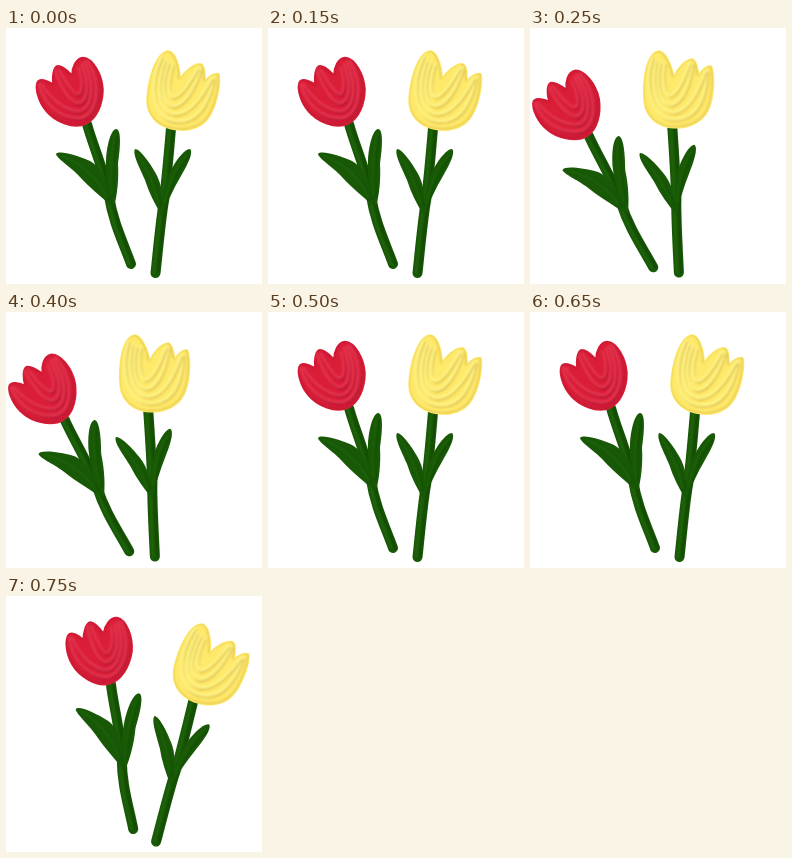
An HTML page for the animation above (1 s loop, 256x256 px).

```html
<!DOCTYPE html>
<html lang="en">
<head>
<meta charset="utf-8">
<title>Swaying tulips</title>
<style>
  html, body { margin: 0; width: 100%; height: 100%; overflow: hidden; background: #fff; }
  svg { display: block; width: 100vw; height: 100vh; }
  path { stroke-linecap: round; stroke-linejoin: round; }
</style>
</head>
<body>
<svg viewBox="0 0 256 256">
  <defs>
    <filter id="soft" filterUnits="userSpaceOnUse" x="0" y="0" width="256" height="256"><feGaussianBlur stdDeviation=".8"/></filter>
  </defs>
  <g id="flowers"></g>
</svg>
<script>
const tulips = [
  {
    base: '#da1e38', dark: '#b01430', light: '#ea3a54',
    stem: 'M81 96C87 118 98 142 103 168C107 194 117 214 125 236',
    leaves: [
      'M50 126C53 122 70 127 84 133C97 140 103 158 106 179C96 169 85 161 73 148C65 139 51 131 50 126Z',
      'M110 101C116 101 114 122 112 136C113 152 111 168 108 179C102 164 99 148 100 132C101 116 105 102 110 101Z'
    ],
    ribs: ['M56 128Q88 141 101 169', 'M109 107Q104 135 106 166'],
    head: 'M31 55C33 49 42 53 47 56C46 49 47 40 51 38C56 37 62 43 66 47C66 39 70 30 77 29.5C87 30 96 46 97 61C97 76 91 91 80 96C67 102 48 93 40 83C33 75 29 62 31 55Z',
    folds: [
      'M83 35C98 60 92 90 74 92C56 92 40 80 34 58',
      'M80 36C92 62 86 84 73 85C59 84 45 72 37 58',
      'M77 38C86 60 82 76 73 77C63 75 56 60 50 44',
      'M74 42C79 58 77 68 72 68C65 64 59 52 54 44'
    ]
  },
  {
    base: '#fee96a', dark: '#dfbf4c', light: '#fff88e',
    stem: 'M165 100C163 124 161 148 158 172C154 198 152 222 149.5 245',
    leaves: [
      'M129 121C134 121 144 135 149 144C156 155 158 172 156 188C149 176 143 165 139 152C134 140 126 126 129 121Z',
      'M184 121C188 124 181 138 175 148C168 160 161 174 156 187C155 172 158 157 164 144C169 134 178 121 184 121Z'
    ],
    ribs: ['M132 126Q148 151 153 176', 'M181 127Q165 145 159 175'],
    head: 'M162 23C169 23 174 38 174 51C178 44 188 35 195 36C199 38 199 46 199 53C203 48 209 44 213 46C215 57 210 79 203 89C195 101 179 104 166 101C151 98 141 87 141 72C142 53 149 25 162 23Z',
    folds: [
      'M157 30C143 60 148 92 170 95C190 97 203 82 209 52',
      'M160 34C150 62 154 86 170 88C186 88 200 66 207 52',
      'M164 36C155 60 158 78 168 80C180 79 190 62 196 42',
      'M168 38C162 58 163 70 169 71C178 68 186 54 193 42'
    ]
  }
];
const green = { base: '#185806', dark: '#104404', light: '#21680c' };

const stroke = (d, color, width, extra = '') =>
  `<path d="${d}" fill="none" stroke="${color}" stroke-width="${width}" ${extra}/>`;
const fill = (d, color) => `<path d="${d}" fill="${color}"/>`;
const shift = (x, y) => `transform="translate(${x} ${y})"`;
const many = (list, draw) => list.map(draw).join('');

const drawTulip = (t, i) => `
  <clipPath id="head${i}">${fill(t.head)}</clipPath>
  ${stroke(t.stem, green.base, 10)}
  <g filter="url(#soft)">
    ${stroke(t.stem, green.dark, 2, shift(2.4, 0))}
    ${stroke(t.stem, green.light, 2, shift(-1.6, 0))}
  </g>
  ${many(t.leaves, d => fill(d, green.base))}
  <g filter="url(#soft)">
    ${many(t.ribs, d => stroke(d, green.dark, 1.5, shift(1.5, 1)) + stroke(d, green.light, 1.5))}
  </g>
  ${fill(t.head, t.base)}${stroke(t.head, t.base, 1.6)}
  <g clip-path="url(#head${i})"><g filter="url(#soft)">
    ${stroke(t.head, t.dark, 2.5, shift(-.8, -.8) + ' opacity=".6"')}
    ${many(t.folds, d => stroke(d, t.dark, 1.8) + stroke(d, t.light, 2, shift(-1.2, -2)))}
  </g></g>`;

const flowers = document.getElementById('flowers');
flowers.innerHTML = many(tulips, drawTulip);

// The pair tips as one around a point near the foot of the yellow stem.
const sway = [0, -8.7, 0, 8.7];
const start = performance.now();

function tick() {
  const step = Math.floor((performance.now() - start) % 1000 / 250);
  flowers.setAttribute('transform', `rotate(${sway[step]} 146 249)`);
  requestAnimationFrame(tick);
}
tick();
</script>
</body>
</html>
```
